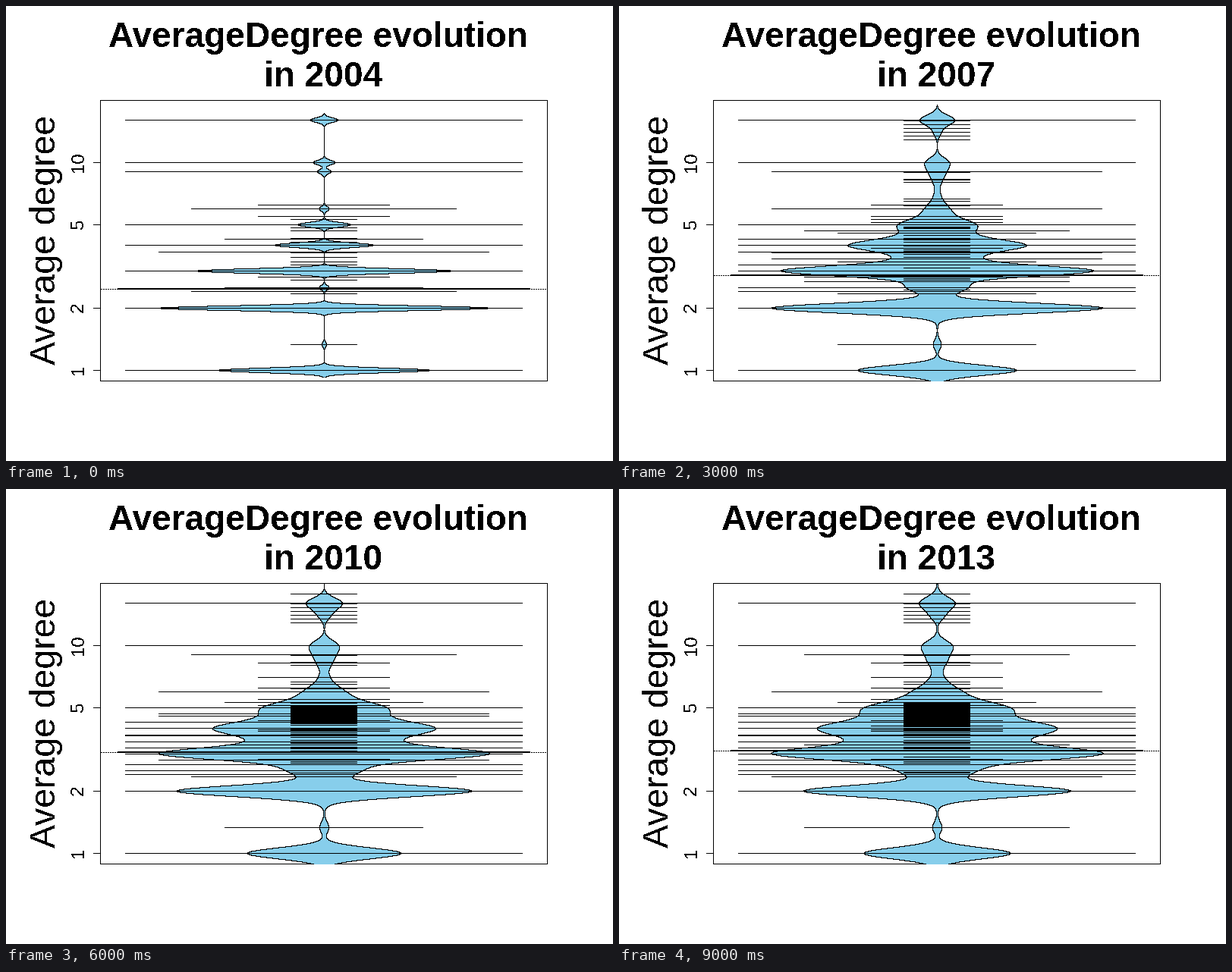
These frames come from a looping animation (800 px wide and 600 px high, 10000 ms). A matplotlib script:

```python
import numpy as np
import matplotlib.pyplot as plt
from matplotlib.animation import FuncAnimation
from matplotlib.collections import LineCollection

plt.rcParams["font.family"] = "Liberation Sans"

PX = 0.72                      # points per pixel at 100 dpi
MID, MAX_HALF, MEAN_HALF = 419, 218, 272
LEFT, RIGHT, TOP, BOTTOM = 124.5, 713.5, 124.5, 494.5
STEP, MAX_COUNT = 43.67, 6
FIRST, YEARS = 2004, 10
HARD = dict(antialiased=False, snap=False)

# degree: bean height relative to degree 2 in years 0, 3 and 8
PEAKS = {1: (.64, .48, .55), 4/3: (.015, .025, .035), 2: (1, 1, 1),
         2.49: (.03, .19, .31), 3: (.77, .945, 1.24), 4: (.30, .54, .90),
         5: (.16, .24, .55), 6: (.03, .08, .20), 8.2: (0, .035, .07),
         9: (.04, .06, .10), 10: (.065, .075, .115), 14: (0, .03, .07),
         16: (.083, .105, .135), 17.6: (0, 0, .045)}
HUMP = (0, .26, .66)           # broad rise between the peaks
HUMP_ROW, HUMP_SIGMA = 322, 33

# degree: networks having it in the first and the last year
COUNTS = {4/3: (1, 4), 7/3: (1, 5), 12/5: (4, 8), 5/2: (3, 8), 8/3: (0, 7),
          14/5: (2, 6), 16/5: (1, 9), 10/3: (1, 4), 24/7: (0, 9),
          11/3: (1, 8), 26/7: (5, 9), 30/7: (3, 8), 32/7: (0, 6),
          14/3: (1, 6), 16/3: (1, 3), 11/2: (2, 2), 6: (4, 5), 8.2: (0, 2),
          9: (6, 4)}
ALWAYS = (1, 2, 3, 4, 5, 10, 16)

RARE = np.random.default_rng(4).normal(312, 30, 60).astype(int).clip(245, 374)


def row_of(degree):
    return np.rint(480.2 - 274.6 * np.log10(degree)).astype(int)


def gauss(y, centre, sigma):
    return np.exp(-0.5 * ((y - centre) / sigma) ** 2)


def bean(t):
    """Half-width of the bean as a function of the pixel row."""
    def at(keys):
        return np.interp(t, (0, 3, 8), keys)

    sigma = 7.5 - 4.5 * np.exp(-t / 2)
    heights = np.array([at(keys) for keys in PEAKS.values()])
    rows = row_of(np.array(list(PEAKS)))[heights > 0]
    heights = heights[heights > 0]
    scale = MAX_HALF / heights.max()

    def hump(y):
        return at(HUMP) * gauss(y, HUMP_ROW, HUMP_SIGMA)

    def kernel(y):
        return gauss(y[:, None], rows, sigma)

    weights = np.linalg.solve(kernel(rows), heights - hump(rows))
    ends = rows.min() - 3 * sigma, rows.max() + 3 * sigma
    return lambda y: scale * np.maximum(kernel(y) @ weights + hump(y), 0), ends


def bean_rows(t):
    """Fill and one-pixel outline, row by row."""
    width, (lo, hi) = bean(t)
    y = np.arange(max(125, int(lo)), min(494, int(hi)) + 1)
    samples = np.array([width(y - 0.5), width(y), width(y + 0.5)])
    fill, edge = [], []
    for row, inner, outer in zip(y, samples.min(0), samples.max(0)):
        a, b = round(inner), round(outer)
        fill.append(span(row, MID - b, MID + b + 1))
        edge.append(span(row, MID - b, MID - a + 1))
        edge.append(span(row, MID + a, MID + b + 1))
    return fill, edge


def span(row, x0, x1):
    return [(x0, row + 0.5), (x1, row + 0.5)]


def stripe_rows(t):
    grown = np.sqrt(t / (YEARS - 1))
    counts = {}

    def put(row, n):
        counts[row] = max(n, counts.get(row, 0))

    for degree in ALWAYS:
        put(row_of(degree), MAX_COUNT)
    for degree, (a, b) in COUNTS.items():
        put(row_of(degree), min(round(a + (b - a) * grown), MAX_COUNT))
    for k, row in enumerate(RARE[:6 + 7 * t]):
        put(row, 2 if k % 5 == 4 else 1)
    if t >= 2:
        for row in (*range(151, 180, 5), 219, 228, 232):
            put(row, 1)
    if t >= 4:
        put(row_of(17.6), 1)
    core = np.clip(4 * (t - 3), 0, 16)     # crowd of values around 4.6
    for row in range(298 - core, 298 + core):
        put(row, 1)

    half = {row: round(STEP * n) for row, n in counts.items() if n}
    return [span(row, MID - h, MID + h) for row, h in half.items()]


def mean_row(t):
    return round(345 + 28 * np.exp(-(t / 2.9) ** 1.35))


fig = plt.figure(figsize=(8, 6), dpi=100, facecolor="white")
ax = fig.add_axes((0, 0, 1, 1))
ax.set(xlim=(0, 800), ylim=(600, 0))
ax.axis("off")


def label(x, y, text, size, turn=0, weight="normal"):
    return ax.text(x, y, text, fontsize=size * PX, rotation=turn,
                   weight=weight, ha="center", va="baseline",
                   rotation_mode="anchor", antialiased=False)


def line(xs, ys, width=1, **kw):
    return ax.plot(xs, ys, color="black", lw=width * PX,
                   solid_capstyle="butt", dash_capstyle="butt", **HARD, **kw)[0]


def row_set(color, z):
    rows = LineCollection([], colors=color, linewidths=PX, antialiaseds=False,
                          capstyle="butt", zorder=z)
    rows.set_snap(False)
    return ax.add_collection(rows, autolim=False)


label(411.8, 54, "AverageDegree evolution", 46, weight="bold")
title = label(417.6, 106, "", 46, weight="bold")
label(65, 308.5, "Average degree", 46.4, 90)

line([LEFT, RIGHT, RIGHT, LEFT, LEFT], [TOP, TOP, BOTTOM, BOTTOM, TOP],
     solid_joinstyle="miter", zorder=1)
for degree in (1, 2, 5, 10):
    row = row_of(degree)
    line([115, 124], [row + 0.5] * 2)
    label(102, row - 0.5, str(degree), 24, 90)

overall = line([125, 713], [0, 0], ls=(0, (2, 2)), zorder=2)
fill, edge, stripes = row_set("skyblue", 3), row_set("black", 4), row_set("black", 5)
mean_bar = line([MID - MEAN_HALF, MID + MEAN_HALF], [0, 0], 2, zorder=6)


def update(t):
    title.set_text(f"in {FIRST + t}")
    inside, border = bean_rows(t)
    fill.set_segments(inside)
    edge.set_segments(border)
    stripes.set_segments(stripe_rows(t))
    mean = mean_row(t)
    overall.set_ydata([mean + 0.5] * 2)
    mean_bar.set_ydata([mean, mean])
    return title, fill, edge, stripes, overall, mean_bar


anim = FuncAnimation(fig, update, frames=YEARS, interval=1000, repeat=True,
                     repeat_delay=0, blit=False)
plt.show()
```
